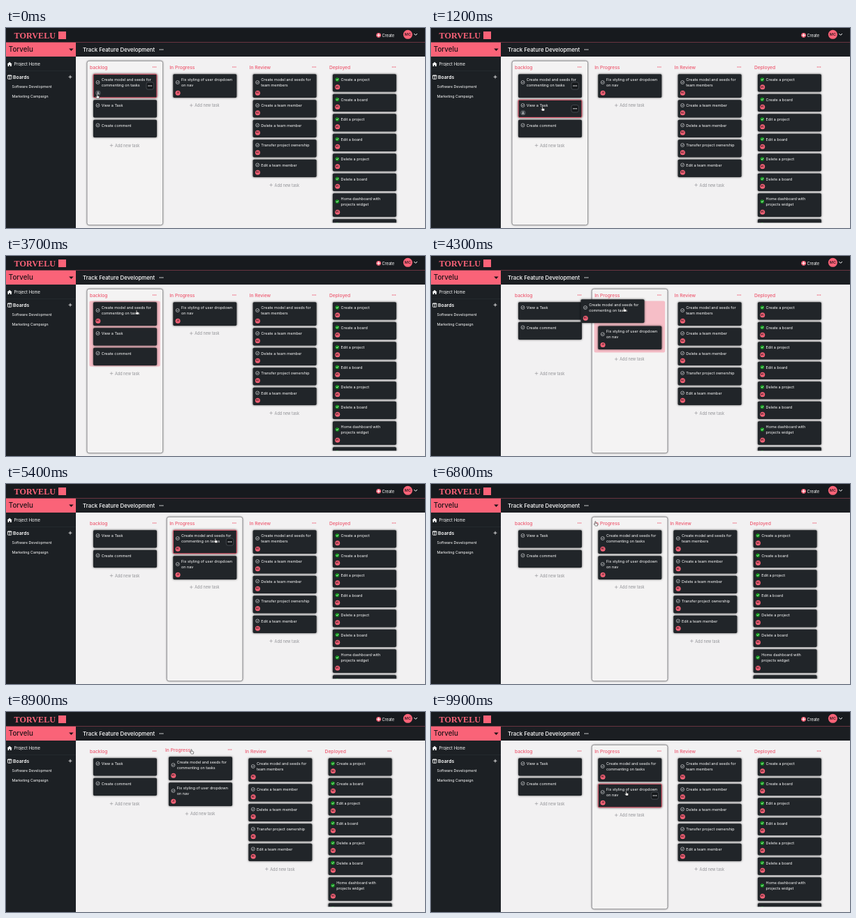
An HTML page that plays this animation: 600x287 px, repeating every 10000 ms.

```html
<!DOCTYPE html>
<html lang="en">
<head>
<meta charset="utf-8">
<title>Task board</title>
<style>
  html, body { margin: 0; width: 100%; height: 100%; overflow: hidden; background: #f2f1f2; }
  svg { display: block; width: 100%; height: 100%; font-family: Inter, "Open Sans", sans-serif; }
  .card { filter: drop-shadow(0 0 1.4px rgba(0, 0, 0, .7)); }
  .frame { filter: drop-shadow(0 0 .8px rgba(0, 0, 0, .35)); }
</style>
</head>
<body>
<svg id="stage" viewBox="0 0 600 287"></svg>
<script>
const LOOP = 10000, STEP = 100;
const PINK = '#fa6378', DARK = '#212529', MUTED = '#909195', TOP = 66, GAP = 3;
const PITCH = 114.3, FIRST = 120, SLIM = 6.3;
const HEIGHT = { 1: 25.5, 2: 34 };

const text = (x, y, s, size, fill, extra = '') =>
  `<text x="${x}" y="${y}" font-size="${size}" fill="${fill}" ${extra}>${s}</text>`;
const rect = (x, y, w, h, fill, extra = '') =>
  `<rect x="${x}" y="${y}" width="${w}" height="${h}" fill="${fill}" ${extra}/>`;
const circle = (x, y, r, fill, extra = '') =>
  `<circle cx="${x}" cy="${y}" r="${r}" fill="${fill}" ${extra}/>`;
const line = (d, stroke, w) =>
  `<path d="${d}" fill="none" stroke="${stroke}" stroke-width="${w}" stroke-linecap="round" stroke-linejoin="round"/>`;
const dots = (x, y, fill, r = .7, gap = 2.1) =>
  [-gap, 0, gap].map(d => circle(x + d, y, r, fill)).join('');
const plus = (x, y, r, stroke, w) =>
  line(`M${x - r} ${y}h${2 * r}M${x} ${y - r}v${2 * r}`, stroke, w);
const avatar = (x, y, r, s) => circle(x, y, r, PINK) +
  text(x, y + r * .31, s, r * .84, '#3a1a22', 'text-anchor="middle" font-weight="600"');

// A card is [title lines, initials]
const columns = [
  { name: 'backlog', cards: [['View a Task'], ['Create comment']] },
  { name: 'In Review', cards: [
    ['Create model and seeds for|team members', 'MC'], ['Create a team member', 'MC'],
    ['Delete a team member', 'MC'], ['Transfer project ownership', 'MC'], ['Edit a team member', 'MC']] },
  { name: 'Deployed', done: true, cards: [
    ['Create a project', 'MC'], ['Create a board', 'MC'], ['Edit a project', 'MC'],
    ['Edit a board', 'MC'], ['Delete a project', 'MC'], ['Delete a board', 'MC'],
    ['Home dashboard with|projects widget', 'MC'], ['User sign up', 'MC']] },
  { name: 'In Progress', cards: [
    ['Fix styling of user dropdown|on nav', 'JD'], ['Create model and seeds for|commenting on tasks', 'MC']] }
];

function cardMarkup([title, who], done) {
  const lines = title.split('|'), h = HEIGHT[lines.length];
  const cy = 4 + 4 * lines.length, ay = h - 6.8;
  const check = done
    ? circle(6.4, cy, 2.7, '#12981c') + line(`M5.1 ${cy}l1 1.1 1.9-2.1`, '#fff', .7)
    : circle(6.5, cy, 2.5, 'none', 'stroke="#e4e6e8" stroke-width=".6"') +
      line(`M5.3 ${cy}l.9 1 1.6-1.8`, '#e4e6e8', .6);
  const person = `<g class="person">${circle(6.8, ay, 3.4, '#43484d', 'stroke="#777d83" stroke-width=".4"')}` +
    circle(6.8, ay - 1, 1, '#b9bdc1') + `<path d="M4.9 ${ay + 1.9}a1.9 1.9 0 0 1 3.8 0z" fill="#b9bdc1"/></g>`;
  return `<g class="card" data-h="${h}">` +
    rect(0, .2, 91, h - .3, DARK, 'class="face" rx="1.6" stroke-width="1"') + check +
    lines.map((s, i) => text(11.7, 10.1 + 8 * i, s, 5.45, '#fff')).join('') +
    person + `<g class="who">${who ? avatar(6.8, ay, 3.5, who) : ''}</g>` +
    `<g class="more">${rect(76, h / 2 - 5.2, 10.4, 10.4, '#16191c', 'rx="2.6" stroke="#5b6167" stroke-width=".6"')}` +
    dots(81.2, h / 2, '#fff', .75) + '</g></g>';
}

function columnMarkup(c) {
  const cards = c.cards.map(k => cardMarkup(k, c.done)).join('');
  return '<g class="col">' +
    rect(-4, 47.2, 108.6, 235.6, '#f4f3f3', 'class="frame" rx="3" stroke="#939396" stroke-width="1"') +
    rect(-.6, 64.5, 101.4, 74, '#f6bec7', 'class="over" rx="2"') +
    text(0, 58.5, c.name, 6.7, '#ee5a70', 'font-weight="500"') + dots(92.6, 56, '#ee5a70') +
    (c.done ? `<g clip-path="url(#fold)">${cards}</g>` :
      `<g class="add">${plus(31, 0, 1.9, MUTED, .6)}${text(36, 2.2, 'Add new task', 5.5, MUTED)}</g>${cards}`) +
    '</g>';
}

const chrome =
  rect(0, 0, 600, 287, '#f2f1f2') +
  rect(0, 0, 600, 41, '#1b1e22') + rect(0, 0, 600, 20, '#171a1e') +
  rect(0, 41, 100, 246, '#1c2024') + rect(0, 61, 100, .6, '#2b3035') +
  rect(0, 20, 600, .8, '#7c3a46') + rect(0, 20.8, 100, 20.2, PINK) +
  text(11.5, 14.6, 'TORVELU', 12.2, PINK, 'font-weight="700" style="font-family:Liberation Serif,serif"') +
  rect(75, 5, 11, 11, PINK) +
  text(3.8, 34.4, 'Torvelu', 9.8, '#1d1216', 'font-weight="500"') +
  '<path d="M90.2 29.4h6.4l-3.2 3.7z" fill="#1d1216"/>' +
  text(110, 33.8, 'Track Feature Development', 7.85, '#fff', 'font-weight="500"') +
  dots(222.5, 31, '#fff', .75) +
  circle(533.6, 10.3, 3.4, PINK) + plus(533.6, 10.3, 2, '#fff', 1) +
  text(538.5, 12.5, 'Create', 5.6, '#fff') +
  avatar(575.4, 9.3, 6.5, 'MC') + line('M584.6 8.3l2 2 2-2', '#fff', 1) +
  '<path d="M5.2 48.8l3.5 3.1h-.9v3.2h-1.8v-2h-1.6v2h-1.8v-3.2h-.9z" fill="#fff"/>' +
  text(11.6, 54.4, 'Project Home', 5.85, '#fff') +
  rect(2.5, 67.8, 5.4, 5.4, 'none', 'rx=".5" stroke="#fff" stroke-width=".8"') +
  line('M2.5 68.6h5.4M5.2 68.6v4.6', '#fff', .8) +
  text(10, 72.9, 'Boards', 6.8, '#fff', 'font-weight="600"') + plus(92, 70.2, 2, '#fff', .8) +
  text(8.5, 85.9, 'Software Development', 5.3, '#fff') +
  text(8.5, 99.8, 'Marketing Campaign', 5.3, '#fff');

const hand = '<g id="hand"><path transform="scale(.85)" d="M-1.3 .2V-3.2q0-.8.7-.8t.7.8V-.9l2.3.5q.9.2.8 1.1L2.8 3.6H-.9L-3 .9q-.3-.7.3-.9.5-.1 1.4 1z" ' +
  'fill="#fff" stroke="#111" stroke-width=".6" stroke-linejoin="round"/></g>';

const stage = document.getElementById('stage');
stage.innerHTML = '<defs><clipPath id="fold"><rect x="-4" y="60" width="110" height="219.5"/></clipPath></defs>' +
  chrome + columns.map(columnMarkup).join('') + hand;

const cols = [...stage.querySelectorAll('.col')].map(el => ({
  el,
  frame: el.querySelector('.frame'), over: el.querySelector('.over'), add: el.querySelector('.add'),
  cards: [...el.querySelectorAll('.card')].map(k => ({
    el: k, h: +k.dataset.h, face: k.querySelector('.face'), person: k.querySelector('.person'),
    who: k.querySelector('.who'), more: k.querySelector('.more')
  }))
}));
const [backlog, review, deployed, progress] = cols;
const [fix, seeds] = progress.cards;
const cursor = document.getElementById('hand');

const show = (el, on) => el.setAttribute('visibility', on ? 'visible' : 'hidden');
const move = (el, x, y) => el.setAttribute('transform', `translate(${x.toFixed(2)} ${y.toFixed(2)})`);
const between = (t, a, b) => t >= a && t < b;
const easeOut = (t, start, dur) => 1 - (1 - Math.min(1, Math.max(0, (t - start) / dur))) ** 3;

// Points are [time, x, y]
function along(path, t) {
  const i = path.findIndex(p => p[0] > t);
  if (i < 0) return path[path.length - 1].slice(1);
  if (i === 0) return path[0].slice(1);
  const a = path[i - 1], b = path[i], u = (t - a[0]) / (b[0] - a[0]), s = u * u * (3 - 2 * u);
  return [a[1] + (b[1] - a[1]) * s, a[2] + (b[2] - a[2]) * s];
}

const pointerPath = [
  [500, 131, 98], [1200, 160, 116], [2000, 160, 143], [2400, 152, 158], [2700, 150, 125],
  [3100, 131, 97], [3300, 131, 97], [3500, 187.5, 81], [3700, 187.5, 81], [4300, 277, 77],
  [4700, 301.5, 81], [5300, 301.5, 81], [5800, 290, 86], [6400, 270, 58], [6700, 268, 57],
  [6800, 236, 57], [7000, 178, 53], [7500, 152, 51], [8300, 152, 55], [8500, 220, 56],
  [8900, 266, 57], [9300, 270, 58], [9900, 280, 117]
];
const slot = i => FIRST + PITCH * i;
const progressPath = [
  [6800, slot(1), 0], [7050, 150, 0], [7500, 121, -.5], [7700, slot(0), 0], [8300, slot(0), 0],
  [8500, 185, -1], [8900, 228, -2], [9100, slot(1), 0]
];
const GRAB = 3700, DROP = 4900, ENTER = 4050;

function stack(col, offset = 0) {
  let y = TOP + offset;
  for (const k of col.cards) {
    k.x = 5; k.y = y;
    y += k.h + GAP;
  }
  return y - GAP;
}

function render(t) {
  const [px, py] = along(pointerPath, t);
  const colDrag = between(t, 6700, 7700) || between(t, 8300, 9200);
  const cardDrag = between(t, GRAB, DROP);
  const slim = colDrag ? SLIM : 0;

  [progress.x, progress.y] = along(progressPath, t);
  const swapped = easeOut(t, 7000, 200) - easeOut(t, 8600, 200);
  backlog.x = slot(0) + (PITCH - slim) * swapped;
  review.x = slot(2) - slim;
  deployed.x = slot(3) - slim;
  backlog.y = review.y = deployed.y = 0;

  const room = HEIGHT[2] + GAP;
  const backEnd = stack(backlog, room * (1 - easeOut(t, 3850, 250)));
  const reviewEnd = stack(review);
  stack(deployed);
  fix.x = 5;
  fix.y = TOP + room * easeOut(t, 4150, 260);
  if (t < GRAB) [seeds.x, seeds.y] = [5 - PITCH, TOP];
  else {
    const settle = easeOut(t, 4750, 150);
    const hx = px - 62.5 - progress.x, hy = py - 15;
    [seeds.x, seeds.y] = t < DROP ? [hx + (5 - hx) * settle, hy + (TOP - hy) * settle] : [5, TOP];
  }

  move(backlog.add, 0, (t < DROP ? 157 : backEnd) + 11.5);
  move(review.add, 0, reviewEnd + 11.3);
  move(progress.add, 0, (t < ENTER ? 100 : 137) + 11);

  for (const c of cols) {
    move(c.el, c.x, c.y);
    const inside = px > c.x - 4 && px < c.x + 104.6;
    show(c.frame, inside && !(colDrag && t >= 6900));
    show(c.over, false);
    for (const k of c.cards) {
      move(k.el, k.x, k.y);
      const dx = px - c.x - k.x, dy = py - 3 - k.y;
      const hover = !cardDrag && !colDrag && dx > 0 && dx < 91 && dy > 0 && dy < k.h;
      const assigned = k === seeds ? t >= 3200 : c !== backlog;
      k.face.setAttribute('stroke', hover ? PINK : 'none');
      show(k.more, hover || (k === seeds && t < GRAB));
      show(k.person, hover && !assigned);
      show(k.who, assigned);
    }
  }
  if (cardDrag) {
    const target = t < ENTER ? backlog : progress;
    show(target.over, true);
    target.over.setAttribute('height', target === backlog ? 94 : 74);
  }
  move(cursor, px, py);
}

const start = performance.now();
function tick() {
  const t = (performance.now() - start) % LOOP;
  render(Math.floor(t / STEP) * STEP);
  requestAnimationFrame(tick);
}
tick();
</script>
</body>
</html>
```
